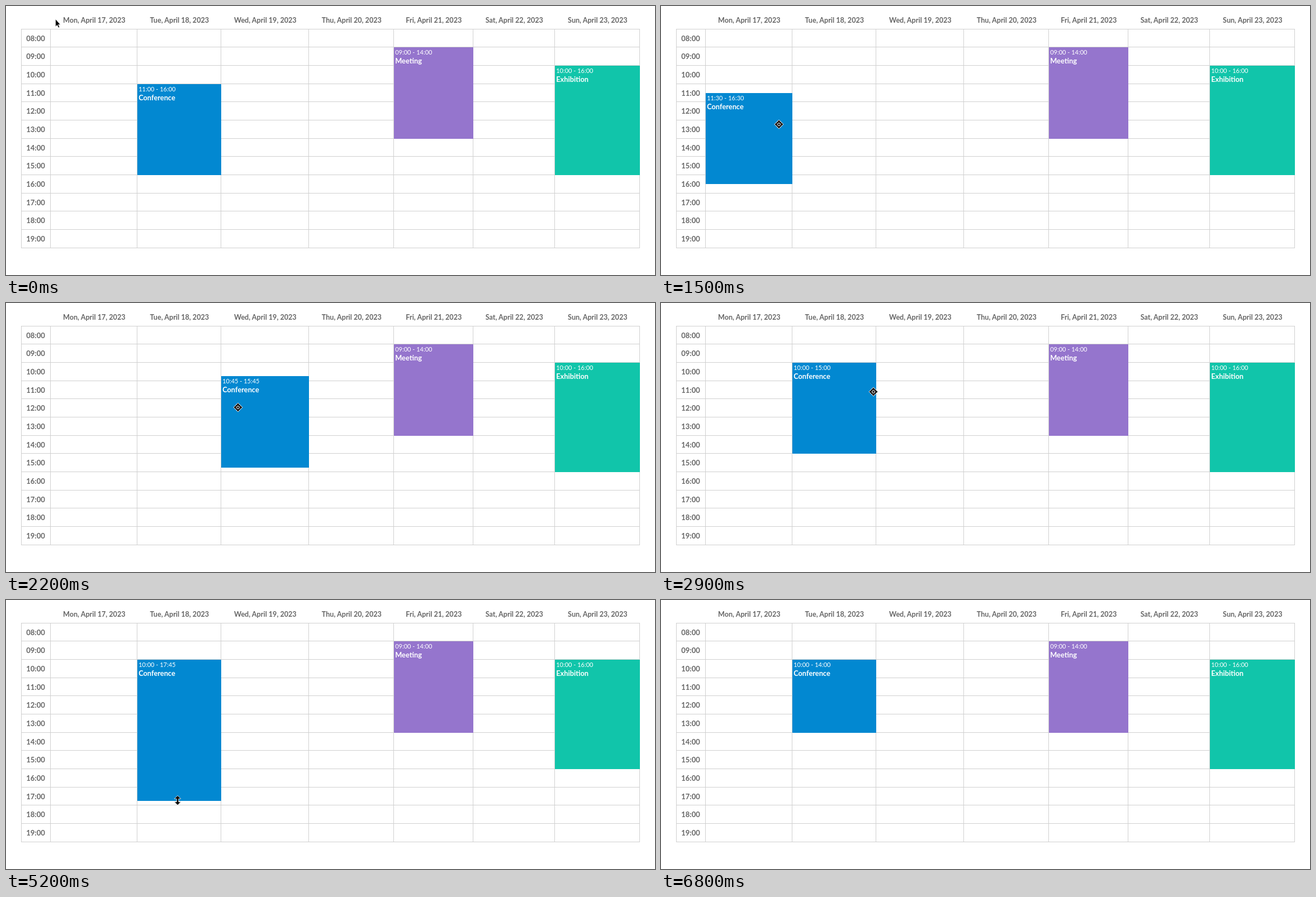
An HTML page that plays this animation: 1161 px wide and 482 px high, repeating every 7.4 s.

```html
<!DOCTYPE html>
<html lang="en">
<head>
<meta charset="utf-8">
<title>Week calendar</title>
<style>
html, body { margin: 0; width: 100%; height: 100%; overflow: hidden; background: #fff; }
svg { display: block; font-family: Lato, "Open Sans", sans-serif; }
rect { shape-rendering: crispEdges; }
.head { font: 700 12.6px Lato, "Open Sans", sans-serif; fill: #666; text-anchor: middle; }
.hour { font-size: 13px; }
.time { font-size: 11px; fill: #fff; }
.name { font-size: 12.8px; font-weight: 700; fill: #fff; }
#cursors path { stroke-linejoin: round; }
</style>
</head>
<body>
<svg id="stage" width="1161" height="482" viewBox="0 0 1161 482">
  <g id="grid"></g>
  <g id="events"></g>
  <g id="cursors">
    <path id="arrow" d="M.5 .5V14L3.5 11.2L5.8 16L7.8 15L5.6 10.3H9.3Z" stroke="#fff" stroke-width=".7"/>
    <g id="move">
      <path d="M0-8L8 0L0 8L-8 0Z" fill="#fff" stroke="#fff"/>
      <path d="M0-7.5L3.2-4.3H-3.2ZM0 7.5L3.2 4.3H-3.2ZM-7.5 0L-4.3-3.2V3.2ZM7.5 0L4.3-3.2V3.2Z"/>
      <rect x="-4" y="-4" width="8" height="8" rx="1"/>
      <circle r="2.3" fill="none" stroke="#fff" stroke-width="1.1"/>
    </g>
    <path id="resize" d="M0-8.5L5.8-2.8H1.8V2.8H5.8L0 8.5L-5.8 2.8H-1.8V-2.8H-5.8Z" stroke="#fff" stroke-width=".8"/>
  </g>
</svg>
<script>
const LOOP = 7400, TOP = 41.6, ROW = 392 / 12;
const edges = [80, 235, 385, 542, 694, 836, 982, 1134];
const days = ['Mon', 'Tue', 'Wed', 'Thu', 'Fri', 'Sat', 'Sun'];
const $ = id => document.getElementById(id);

const yOf = hour => Math.round(TOP + (hour - 8) * ROW);
const hourAt = y => 8 + (y - TOP) / ROW;
const pad = n => String(n).padStart(2, '0');
const clock = h => pad(Math.floor(h)) + ':' + pad(h % 1 * 60);
const rect = (x, y, w, h, fill) =>
  `<rect x="${x}" y="${y}" width="${w}" height="${h}" fill="${fill}"/>`;
const text = (x, y, cls, s) => `<text x="${x}" y="${y}" class="${cls}">${s}</text>`;

function drawGrid() {
  let out = '';
  for (let h = 8; h <= 20; h++) {
    out += rect(27, yOf(h) - 1, 1107, 1, '#d0d0d0');
    if (h < 20) out += text(53, TOP + (h - 7.5) * ROW + 4.8, 'head hour', clock(h));
  }
  for (const x of [28, ...edges]) out += rect(x - 1, 41, 1, 393, '#d0d0d0');
  days.forEach((d, i) => {
    out += text((edges[i] + edges[i + 1]) / 2 + .3, 30.3, 'head', `${d}, April ${17 + i}, 2023`);
  });
  $('grid').innerHTML = out;
}

function eventBox(day, start, end, name, fill) {
  const x = edges[day], y = yOf(start);
  return rect(x, y, edges[day + 1] - x, yOf(end) - y, fill) +
    text(x + 2.2, y + 13, 'time', `${clock(start)} - ${clock(end)}`) +
    text(x + 2.2, y + 28.5, 'name', name);
}

// Pointer path: time, x, y
const path = [
  [0, 88, 23], [300, 185, 92], [500, 300, 175], [700, 330, 192], [800, 331, 180],
  [1000, 331, 110], [1100, 327, 123], [1300, 275, 190], [1500, 211, 212], [1600, 205, 203],
  [1800, 262, 204], [2000, 350, 200], [2200, 415, 187], [2300, 432, 160], [2400, 440, 164],
  [2500, 440, 164], [2900, 380, 159], [3100, 345, 157], [3300, 335, 156], [3400, 335, 156],
  [3700, 322, 232], [3900, 316, 276], [4100, 315, 262], [4300, 315, 262], [4400, 315, 266],
  [4700, 310, 350], [4900, 308, 381], [5100, 307, 368], [5200, 307, 359], [5300, 307, 359],
  [5400, 308, 358], [5500, 308, 358], [5600, 309, 360], [5900, 328, 262], [6100, 338, 233],
  [6400, 338, 233], [6700, 160, 28]
];

function pointer(t) {
  const i = path.findIndex(p => p[0] > t);
  if (i < 0) return path[path.length - 1].slice(1);
  const [a, b] = [path[i - 1], path[i]];
  const k = (t - a[0]) / (b[0] - a[0]);
  return [1, 2].map(j => Math.round(a[j] + (b[j] - a[j]) * k));
}

function booking(t) {
  if (t < 800) return [1, 11, 16];
  if (t < 3300) {
    const [x, y] = pointer(t);
    const start = Math.round(hourAt(y - 52) * 4) / 4;
    return [edges.findIndex(e => e > x) - 1, start, start + 5];
  }
  if (t < 4400) return [1, 10, 15];
  const y = pointer(Math.min(t, 6400))[1];
  return [1, 10, Math.floor(hourAt(y + 8) * 4) / 4];
}

function cursorAt(t) {
  if (t >= 6800) return '';
  if (t >= 800 && t < 3300) return 'move';
  return t >= 4000 && t < 6500 ? 'resize' : 'arrow';
}

let shown = -1;
function frame(now) {
  const t = Math.floor(now % LOOP / 100) * 100;
  if (t !== shown) {
    shown = t;
    $('events').innerHTML =
      eventBox(...booking(t), 'Conference', '#0288d1') +
      eventBox(4, 9, 14, 'Meeting', '#9575cd') +
      eventBox(6, 10, 16, 'Exhibition', '#11c5aa');
    const active = cursorAt(t);
    for (const id of ['arrow', 'move', 'resize'])
      $(id).style.display = id === active ? '' : 'none';
    $('cursors').setAttribute('transform', `translate(${pointer(t)})`);
  }
  requestAnimationFrame(frame);
}

drawGrid();
const begin = performance.now();
const tick = () => frame(Math.max(0, performance.now() - begin));
frame = (draw => now => draw(Math.max(0, now - begin)))(frame);
tick();
</script>
</body>
</html>
```
